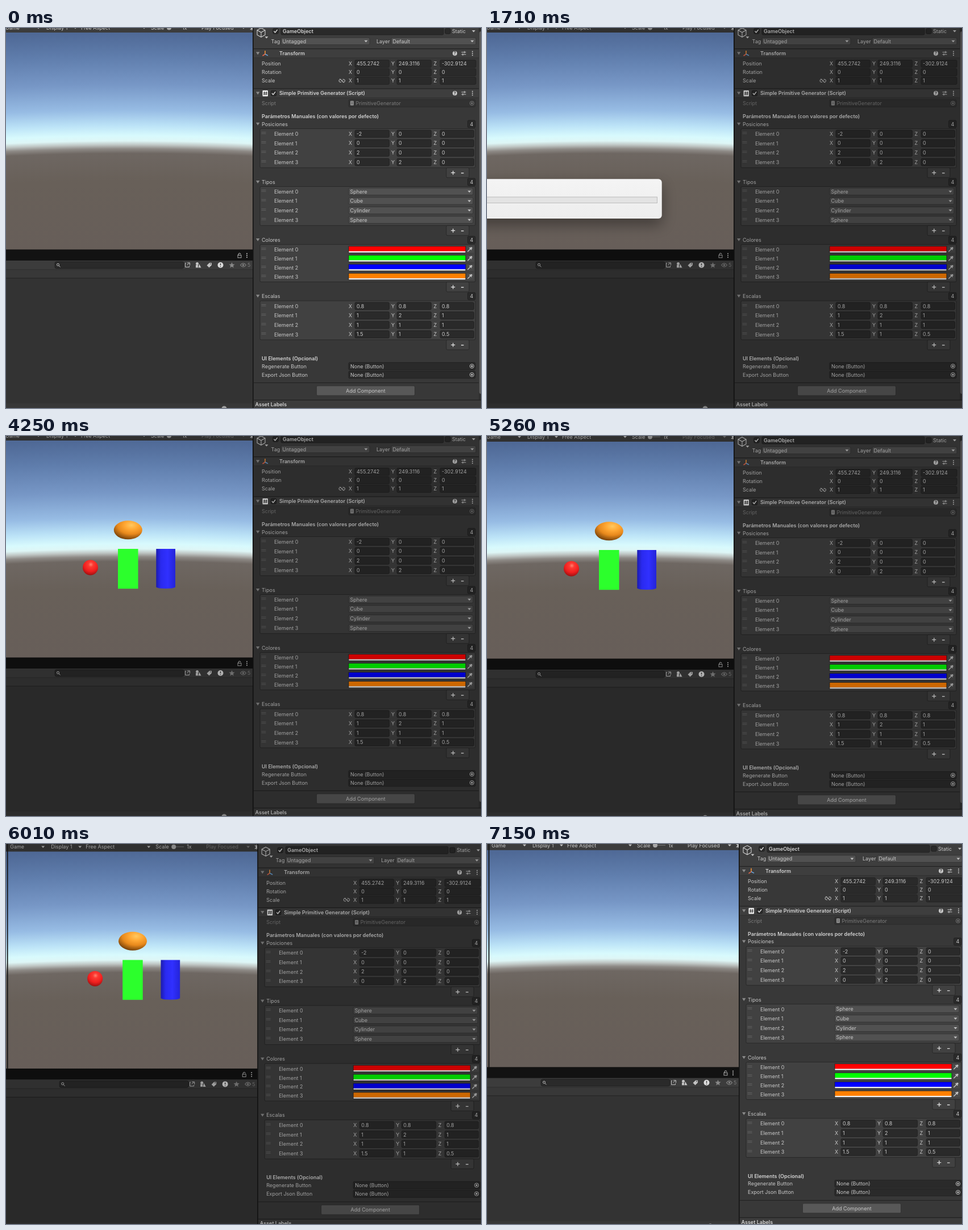
Recreate the animation shown at these times as an HTML page. Size 836x670 px, loop 7830 ms.

```html
<!DOCTYPE html>
<html lang="es">
<head>
<meta charset="utf-8">
<title>Simple Primitive Generator</title>
<style>
html, body { margin: 0; width: 100%; height: 100%; overflow: hidden; background: #383838; }
svg { display: block; width: 836px; height: 670px; }
text { font: 9px Inter, sans-serif; fill: #c8c8c8; white-space: pre; }
.b { font-weight: 600; fill: #d4d4d4; }
.dim { fill: #7c7c7c; }
.mid { text-anchor: middle; }
</style>
</head>
<body>
<svg viewBox="0 0 836 670">
  <defs>
    <radialGradient id="sky" gradientUnits="userSpaceOnUse" cx="217" cy="4912" r="4904" fr="4521"></radialGradient>
    <radialGradient id="red" cx=".53" cy=".3" r=".75">
      <stop offset="0" stop-color="#ff8270"/><stop offset=".22" stop-color="#fd3a32"/>
      <stop offset=".6" stop-color="#f01e1e"/><stop offset="1" stop-color="#8c1010"/>
    </radialGradient>
    <radialGradient id="orange" cx=".62" cy=".24" r=".8">
      <stop offset="0" stop-color="#ffc860"/><stop offset=".3" stop-color="#ffa733"/>
      <stop offset=".6" stop-color="#e8891c"/><stop offset="1" stop-color="#6e3c08"/>
    </radialGradient>
    <linearGradient id="blue">
      <stop offset="0" stop-color="#1c1cae"/><stop offset=".25" stop-color="#2a2af0"/>
      <stop offset=".6" stop-color="#3030ff"/><stop offset="1" stop-color="#2424d8"/>
    </linearGradient>
    <linearGradient id="paper" x2="0" y2="1">
      <stop offset="0" stop-color="#f4f4f4"/><stop offset="1" stop-color="#ededed"/>
    </linearGradient>
    <filter id="shadow" x="-30%" y="-60%" width="160%" height="260%">
      <feDropShadow dx="0" dy="11" stdDeviation="13" flood-opacity=".38"/>
    </filter>
  </defs>
  <g id="desk">
    <g id="ui"></g>
    <rect id="tint" x="-20" y="-40" width="880" height="760" opacity=".2"/>
    <g id="game"></g>
    <g id="shapes">
      <circle cx="148.5" cy="232" r="13.5" fill="url(#red)"/>
      <path d="M197 199h35.5v70.3H197z" fill="#2cff2c"/>
      <path d="M264.3 199H298v67.5q-3 2.5-16.8 2.5t-16.9-2.5z" fill="url(#blue)"/>
      <ellipse cx="214.8" cy="165.8" rx="25" ry="16.5" fill="url(#orange)"/>
    </g>
  </g>
  <g id="dialog">
    <rect x="-28" y="266.3" width="335.7" height="69.7" rx="6" fill="url(#paper)" filter="url(#shadow)"/>
    <rect x="-20" y="298" width="319.5" height="10.5" fill="#e3e3e3" stroke="#bcbcbc"/>
  </g>
</svg>
<script>
const $ = id => document.getElementById(id);
const LOOP = 7830;

// Drawing helpers; every y given to a text or control is its middle line.
const text = (x, y, s, cls = '') => `<text x="${x}" y="${y + 3.3}" class="${cls}">${s}</text>`;
const box = (x1, y1, x2, y2, fill, stroke, r = 0) =>
  `<rect x="${x1}" y="${y1}" width="${x2 - x1}" height="${y2 - y1}" rx="${r}" fill="${fill}"` +
  (stroke ? ` stroke="${stroke}" stroke-width=".8"` : '') + '/>';
const line = (d, color = '#c4c4c4', w = 1) =>
  `<path d="${d}" fill="none" stroke="${color}" stroke-width="${w}"/>`;
const shape = (d, color = '#c4c4c4') => `<path d="${d}" fill="${color}"/>`;
const dot = (x, y, r, color) => `<circle cx="${x}" cy="${y}" r="${r}" fill="${color}"/>`;
const ring = (x, y, r, color) => `<circle cx="${x}" cy="${y}" r="${r}" fill="none" stroke="${color}"/>`;
const down = (x, y, color = '#c0c0c0') => shape(`M${x - 3} ${y - 1.5}h6l-3 3.5z`, color);
const fold = y => shape(`M440 ${y - 2.5}h6.4l-3.2 5z`, '#8a8a8a');
const dots = (x, y) => [-3.3, 0, 3.3].map(d => dot(x, y + d, 1, '#c8c8c8')).join('');
const field = (x1, x2, y, s = '', cls = '') =>
  box(x1, y - 6.5, x2, y + 6.5, '#2a2a2a', '#202020', 2) + text(x1 + 3, y, s, cls);
const menu = (x1, x2, y, s) =>
  box(x1, y - 6.2, x2, y + 6.2, '#515151', '#303030', 2) + text(x1 + 2.5, y, s) + down(x2 - 6.5, y);
const check = (x, y, on) => box(x - 4.7, y - 4.7, x + 4.7, y + 4.7, '#2a2a2a', '#1c1c1c', 2) +
  (on ? line(`M${x - 3} ${y}l2.2 2.4 4-5`, '#e0e0e0', 1.4) : '');
const target = (y, color = '#c4c4c4') => ring(820, y, 3.6, color) + dot(820, y, 1.6, color);
const vector = (y, values, end) => 'XYZ'.split('').map((axis, i) =>
  text([603, 678, 752.5][i], y, axis) + field([614, 688, 764][i], [674.5, 748.5, end][i], y, values[i])).join('');

function header(y, title) {
  return box(436, y - 8, 832, y + 8, '#3e3e3e') + line(`M436 ${y - 8}H832`, '#1d1d1d') +
    line(`M436 ${y + 8}H832`, '#303030') + fold(y) + text(481, y, title, 'b') +
    dot(790, y, 4, '#c8c8c8') + `<text x="790" y="${y + 2.5}" class="mid" style="font-size:7px;font-weight:700;fill:#333">?</text>` +
    line(`M801.5 ${y - 2}h8M801.5 ${y + 2}h8M807 ${y - 4}v4M804 ${y}v4`) + dots(821, y);
}

function list(title, y, top, bottom, first, gap, row) {
  let s = fold(y) + text(450, y, title) + field(812.5, 826, y, '') + text(816.5, y, '4') +
    box(447, top, 826, bottom, '#414141', '#242424', 2) +
    box(775, bottom, 815, bottom + 17.5, '#414141', '#242424', 2) +
    line(`M783.3 ${bottom + 9}h7M786.8 ${bottom + 5.5}v7M801 ${bottom + 9.5}h4.6`, '#d8d8d8', 1.4);
  for (let i = 0; i < 4; i++) {
    const ry = first + gap * i;
    s += line(`M449.5 ${ry - 2.7}h8M449.5 ${ry - .2}h8`, '#626262') + text(472, ry + .2, 'Element ' + i) + row(ry, i);
  }
  return s;
}

function inspector() {
  const places = [[-2, 0, 0], [0, 0, 0], [2, 0, 0], [0, 2, 0]];
  const scales = [[.8, .8, .8], [1, 2, 1], [1, 1, 1], [1.5, 1, .5]];
  const kinds = ['Sphere', 'Cube', 'Cylinder', 'Sphere'];
  const colors = ['#f00', '#0f0', '#00f', '#ff8000'];
  let s = box(435, -40, 860, 720, '#383838') +
    box(435, -40, 860, -8.5, '#282828') + box(436, -24, 522, -8.5, '#3c3c3c') + text(447, -16.3, 'Inspector') +
    box(436, -8.5, 832, 36.5, '#3e3e3e');

  s += line('M449 0l7 3.8v8.4l-7 3.8-7-3.8V3.8zM442 3.8l7 4 7-4M449 7.8V16', '#d0d0d0', 1.1) + down(458.5, 16.5) +
    check(474.5, 5.5, true) + field(484, 770, 5.5, 'GameObject', 'b') +
    check(777.5, 5.5) + text(785, 5.5, 'Static') + down(823, 5.5) +
    text(466.5, 23.3, 'Tag') + menu(484, 640, 23.3, 'Untagged') +
    text(652, 23.3, 'Layer') + menu(678, 827, 23.3, 'Default');

  s += header(44.7, 'Transform') + line('M456 46v-6', '#f0913a', 1.6) + line('M456 46l-4.5 3', '#e8674a', 1.6) +
    line('M456 46l5 2.6', '#6aa5dc', 1.6) +
    text(450, 63, 'Position') + vector(63, ['455.2742', '249.3116', '-302.9124'], 827) +
    text(450, 78, 'Rotation') + vector(78, [0, 0, 0], 827) +
    text(450, 93, 'Scale') + vector(93, [1, 1, 1], 827) +
    line('M590 90.5h-1.5a2.4 2.4 0 0 0 0 5h1.5M592.5 90.5h1.5a2.4 2.4 0 0 1 0 5h-1.5M589.5 93h4M587.5 89.5l7 7');

  s += header(115, 'Simple Primitive Generator (Script)') + box(451.5, 110, 461, 120.5, '#f0f0f0', '', 1) +
    line('M455 112l-.8 6.500M458.500 112l-.8 6.500M453 114h7M453 116.500h7', '#333') + check(471, 115, true) +
    text(450, 132.7, 'Script', 'dim') + box(603, 126.2, 826, 139.2, '#323232', '#2a2a2a', 2) +
    box(606, 128.5, 612, 136.5, '#909090', '', 1) + line('M607.5 131h3M607.5 133.500h3', '#4a4a4a') +
    text(615.5, 132.7, 'PrimitiveGenerator', 'dim') + target(132.7, '#747474') +
    text(450, 155.7, 'Parámetros Manuales (con valores por defecto)', 'b');

  s += list('Posiciones', 169.3, 177.5, 246.3, 186.5, 16.65, (y, i) => vector(y, places[i], 823.5)) +
    list('Tipos', 271.5, 279.5, 348.3, 288.3, 16.65, (y, i) => menu(603, 822, y, kinds[i])) +
    list('Colores', 373.6, 381.7, 447.7, 390.8, 15.9, (y, i) =>
      box(602.6, y - 6.2, 809.4, y + 5.6, '#202020') + box(603.4, y - 5.6, 808.6, y + 3, colors[i]) +
      box(603.4, y + 2.8, 808.6, y + 5, '#fff') + box(810, y - 6, 823.5, y + 5.5, '#4a4a4a') +
      line(`M812.5 ${y + 3.5}l5-5M815.5 ${y - 3.5}l4 4`, '#c4c4c4', 1.4) + dot(818.8, y - 2.8, 1.8, '#c4c4c4')) +
    list('Escalas', 472.8, 481, 549.8, 490.2, 16.65, (y, i) => vector(y, scales[i], 823.5));

  s += text(450, 582.7, 'UI Elements (Opcional)', 'b');
  [['Regenerate Button', 596.2], ['Export Json Button', 611.3]].forEach(([name, y]) => {
    s += text(450, y, name) + field(603, 826, y, 'None (Button)') + target(y);
  });
  s += line('M436 625.5H832', '#202020') + box(546.5, 631, 719.5, 648, '#585858', '#303030', 2) +
    text(633, 639.6, 'Add Component', 'mid') +
    box(832, -8, 860, 656, '#303030') + box(832.8, 6, 840, 645, '#5c5c5c', '', 3) +
    box(436, 656, 860, 720, '#3c3c3c') + line('M436 656H860', '#1b1b1b') + text(438.5, 663.5, 'Asset Labels', 'b');
  return s;
}

function gameBar() {
  const y = -.5;
  let s = box(-20, -40, 434, -8.5, '#282828') + box(-4, -24, 61, -8.5, '#3c3c3c') + text(16, -16.3, 'Game') +
    box(-20, -8.5, 434, 8, '#3c3c3c') +
    text(-1, y, 'Game') + text(71, y, 'Display 1') + text(132, y, 'Free Aspect') + text(255, y, 'Scale') +
    line(`M284 ${y}h21`, '#6a6a6a', 1.4) + dot(287, y, 4, '#a8a8a8') + text(310, y, '1x') +
    `<g id="focus">${text(344, y, 'Play Focused') + down(418, y)}</g>` +
    line('M430 -3l6 6M430 3l6-6M433 -4v8', '#c4c4c4', 1.4);
  [57, 122, 243].forEach(x => s += down(x, y));
  return s;
}

function project() {
  const y = 418;
  return box(-20, 390, 434, 410, '#121212') + box(-20, 410, 434, 441, '#3c3c3c') +
    box(-20, 426, 434, 441, '#383838') + line('M-20 426H434', '#2c2c2c') +
    box(-20, 441, 434, 720, '#333') + line('M-20 441H434', '#222') +
    box(-20, 662, 434, 720, '#383838') + dot(384, 671, 4.5, '#a0a0a0') +
    box(408, 400.5, 414, 405, 'none', '#d0d0d0') + line('M409 400.5v-1.500a2 2 0 0 1 4 0') + dots(424, 401) +
    box(86, 412, 313, 424, '#2a2a2a', '#1e1e1e', 3) + ring(91.5, 417.3, 2, '#c4c4c4') + line('M93 419l2.5 2.500') +
    line(`M317 414.500h-1.500v7h7v-2M318.500 ${y}l4-3.500M319 414h4.500v4.500`) +
    dot(336.5, 415.5, 2.5, '#c4c4c4') + box(334, 418, 338, 422.5, '#c4c4c4') + shape('M340 416l3.500 6.500h-5z') +
    shape('M353.500 418.500l4.500-4.500h4v4l-4.500 4.500z') + dot(360, 415.8, .9, '#3c3c3c') +
    dot(377.5, y, 5, '#dedede') + line('M377.500 415v3.600M377.500 420v1.300', '#3a3a3a', 1.4) +
    shape('M397.500 413l1.400 3.400 3.700.3-2.800 2.400.9 3.600-3.200-2-3.200 2 .9-3.600-2.800-2.400 3.700-.3z', '#888') +
    line('M412.500 418q5-6.500 10 0q-5 6.500-10 0z', '#808080', 1.2) + dot(417.5, y, 1.8, '#808080') +
    text(425, y, '5', 'dim');
}

const horizon = [[8, '#4f6996'], [50, '#5f7dac'], [100, '#7797c6'], [145, '#97bce4'], [172, '#bce3f7'],
  [190, '#d8fafd'], [199, '#def6f6'], [206, '#bfc6c4'], [213, '#8d8985'], [221, '#6e6762'],
  [270, '#686059'], [391, '#675e59']];
$('sky').innerHTML = horizon.reverse().map(([y, c]) =>
  `<stop offset="${(391 - y) / 383}" stop-color="${c}"/>`).join('');
$('ui').innerHTML = project() + gameBar() + inspector() + box(434, -40, 435.6, 720, '#141414');
$('game').innerHTML = box(-20, 8, 434, 390.5, 'url(#sky)') + box(-6.5, -8, -4.7, 391, '#141414');

// Recorder view drift: time, x, y.
const pan = [[0, 0, 0], [5190, 0, 2], [5270, .2, 6], [5340, .6, 11], [5410, 1, 15.2],
  [5480, 3, 13], [5550, 6, 9], [6010, 8.2, 5.4], [6080, 9, 2.8]];
// Dialog: time, opacity, scale.
const pop = [[0, 0, .9], [1510, .3, .94], [1580, .65, .97], [1640, .9, .99], [1710, 1, 1],
  [3360, .68, .97], [3450, .3, .95], [3500, 0, .9]];
const at = (steps, t) => steps.findLast(s => s[0] <= t);
const show = (id, on) => $(id).style.display = on ? '' : 'none';

function draw(now) {
  const t = now % LOOP;
  const [, x, y] = at(pan, t);
  const [, alpha, k] = at(pop, t);
  const running = t >= 4250 && t < 6680;
  $('desk').setAttribute('transform', `translate(${x} ${y})`);
  $('dialog').setAttribute('transform', `translate(140 301) scale(${k}) translate(-140 -301)`);
  $('dialog').setAttribute('opacity', alpha);
  show('dialog', alpha > 0);
  show('tint', t >= 1230 && t < 6680);
  show('shapes', running);
  $('focus').setAttribute('opacity', running ? .45 : 1);
}

const start = performance.now();
function tick() {
  draw(performance.now() - start);
  requestAnimationFrame(tick);
}
tick();
</script>
</body>
</html>
```
